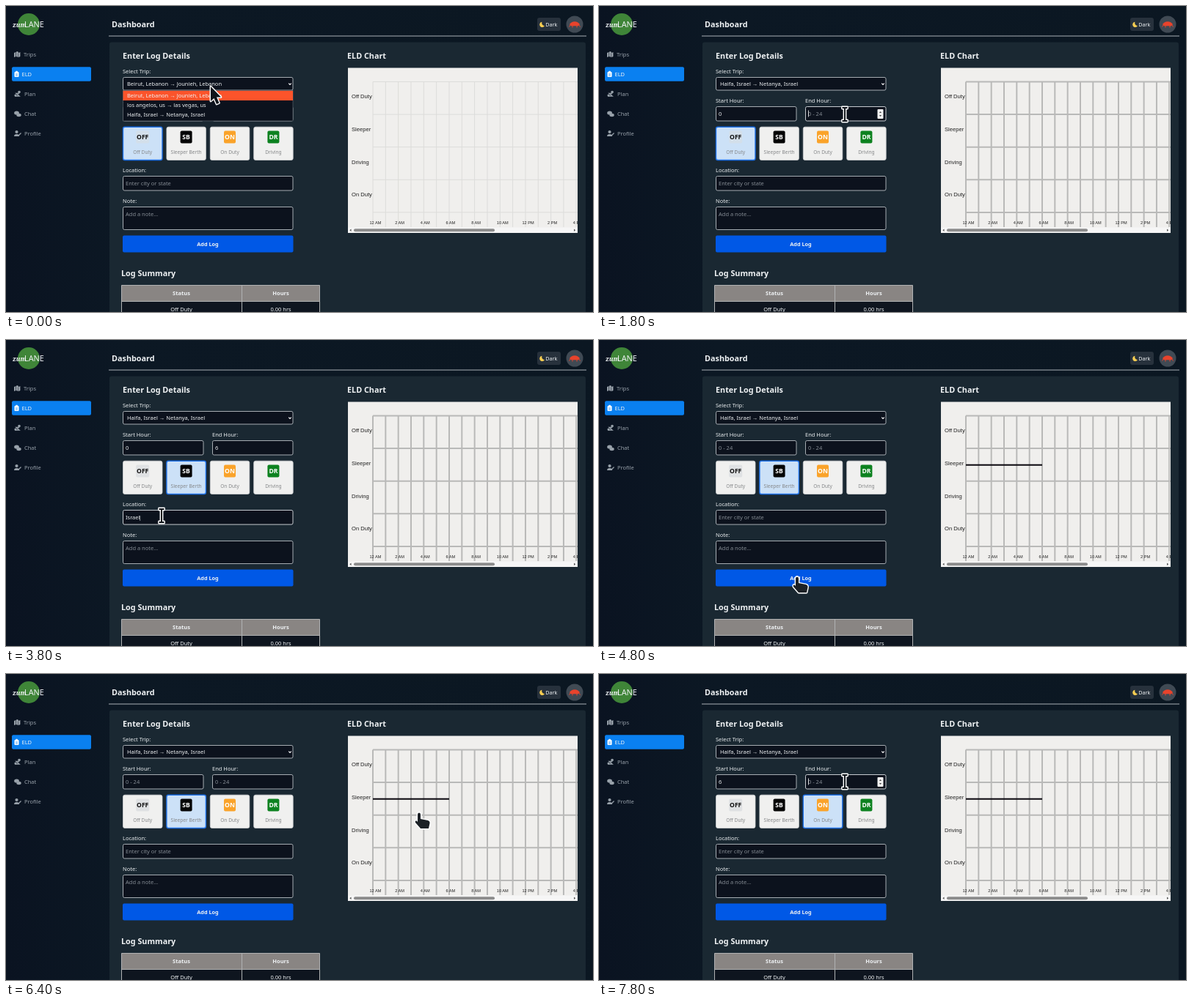
Animation, 800 px wide and 418 px high, one loop 8000 ms. Source, as an HTML page:

```html
<!DOCTYPE html>
<html lang="en">
<head>
<meta charset="utf-8">
<title>Driver log dashboard</title>
<style>
html, body { margin: 0; width: 100%; height: 100%; overflow: hidden; background: #0b1722; }
svg { display: block; width: 100%; height: 100%; }
text { font-family: "Noto Sans", "Open Sans", sans-serif; font-size: 7.5px; fill: #eef1f3; white-space: pre; }
.bold { font-weight: 700; }
.heading { font-weight: 600; font-size: 10.8px; }
.muted { fill: #98a1aa; }
.hint { fill: #858c94; }
.small { font-size: 6.6px; fill: #858789; }
.chart { font-family: "Liberation Sans", Arial, sans-serif; font-size: 7.6px; fill: #222; }
.axis { font-family: "Liberation Sans", Arial, sans-serif; font-size: 5.6px; fill: #222; }
</style>
</head>
<body>
<svg viewBox="0 0 800 418">
  <defs>
    <linearGradient id="backdrop">
      <stop offset="0" stop-color="#0a1321"/>
      <stop offset=".2" stop-color="#0c1824"/>
      <stop offset="1" stop-color="#0b1722"/>
    </linearGradient>
    <clipPath id="chartClip"><rect x="466" y="84.6" width="313" height="225.4"/></clipPath>
  </defs>
  <g id="page"></g>
  <g id="live"></g>
</svg>
<script>
const LOOP = 8000, STEP = 200;
const page = document.getElementById('page');
const live = document.getElementById('live');

const rect = (x, y, w, h, fill, extra = '') =>
  `<rect x="${x}" y="${y}" width="${w}" height="${h}" fill="${fill}" ${extra}/>`;
const text = (x, y, content, cls = '', extra = '') =>
  `<text x="${x}" y="${y}" class="${cls}" ${extra}>${content}</text>`;
const centered = (x, y, content, cls, extra = '') =>
  text(x, y, content, cls, `text-anchor="middle" ${extra}`);
const path = (d, fill, extra = '') => `<path d="${d}" fill="${fill}" ${extra}/>`;
const line = (d, stroke, width = 1) => path(d, 'none', `stroke="${stroke}" stroke-width="${width}"`);
const circle = (x, y, r, fill) => `<circle cx="${x}" cy="${y}" r="${r}" fill="${fill}"/>`;
const box = (x, y, w, h, stroke = '#a6acb2') =>
  rect(x + .5, y + .5, w - 1, h - 1, '#0c121d', `rx="2" stroke="${stroke}"`);

// Each track lists [time, value]; the value holds until the next entry.
const tracks = {
  open: [[0, true], [400, false]],
  option: [[0, 0], [200, 2]],
  start: [[0, ''], [1000, '1'], [1200, ''], [1400, '0'], [4600, ''], [7400, '6']],
  end: [[0, ''], [2000, '6'], [4600, '']],
  place: [[0, ''], [3400, 'I'], [3600, 'Isra'], [3800, 'Israel'], [4600, '']],
  focus: [[0, ''], [800, 'start'], [1800, 'end'], [2400, ''], [3200, 'place'],
          [4400, ''], [7200, 'start'], [7800, 'end']],
  duty: [[0, [0]], [2600, [0, 1]], [2800, [1]], [7000, [2]]],
  logged: [[0, false], [4600, true]],
  faintGrid: [[0, true], [200, false]],
};
const pointer = [
  [0, 279, 110, 'arrow'], [200, 262, 148, 'arrow'], [400, 262, 148, 'arrow'],
  [800, 240, 148, 'beam'], [1600, 240, 148, 'beam'], [1800, 335, 148, 'beam'],
  [2200, 335, 148, 'beam'], [2400, 294, 178, 'hand'], [2600, 243, 207, 'hand'],
  [2800, 243, 207, 'hand'], [3000, 228, 224, 'arrow'], [3200, 212, 240, 'beam'],
  [4000, 212, 240, 'beam'], [4200, 240, 288, 'beam'], [4400, 270, 324, 'hand'],
  [4800, 270, 324, 'hand'], [5000, 285, 260, 'arrow'], [5600, 314, 102, 'arrow'],
  [5800, 330, 110, 'arrow'], [6200, 500, 170, 'arrow'], [6400, 563, 190, 'hand'],
  [6600, 480, 192, 'arrow'], [6800, 312, 190, 'hand'], [7000, 305, 188, 'hand'],
  [7200, 240, 148, 'beam'], [7400, 240, 148, 'beam'], [7800, 335, 147, 'beam'],
];

const valueAt = (track, time) => track.filter(([t]) => t <= time).pop()[1];

function pointerAt(time) {
  const i = pointer.findLastIndex(([t]) => t <= time);
  const a = pointer[i], b = pointer[i + 1] || a;
  const k = a === b ? 0 : (time - a[0]) / (b[0] - a[0]);
  return { x: a[1] + (b[1] - a[1]) * k, y: a[2] + (b[2] - a[2]) * k, kind: a[3] };
}

const outlined = 'stroke="#fff" stroke-width="2.8" stroke-linejoin="round" paint-order="stroke"';
const cursors = {
  arrow: path('M0 0V20L4.5 16L8 24L11.5 22.5L8 14.5H14Z', '#10151b', outlined),
  beam: path('M-3.5-10H3.5V-8H1V8H3.5V10H-3.5V8H-1V-8H-3.5Z', '#10151b', outlined),
  hand: path('M-2 2Q-2-.5 0-.5T2 2V8L12 10Q15 11 14.5 14L13 21H2L-5 13Q-6 10-3.5 10.5L-2 12Z',
    '#1c2126', outlined),
};

function sidebar() {
  const icons = [
    path('M11 64l2.4-1v6l-2.4 1zM14 63l2.5 1v6l-2.5-1zM17 64l2.4-1v6l-2.4 1z', '#98a1aa') + circle(15.3, 63.5, 1.5, '#98a1aa'),
    rect(11.5, 90, 6, 7, '#fff', 'rx="1"') + rect(13, 88.8, 3, 2.2, '#fff', 'rx="1"') + line('M13 93H16M13 95H16', '#0a84f5', .7),
    line('M12 123H18L14 119.5H18', '#98a1aa', 1.4) + circle(13, 122, 1.6, '#98a1aa') + circle(18, 117.6, 1.8, '#98a1aa'),
    `<ellipse cx="14.5" cy="146" rx="3.4" ry="2.6" fill="#98a1aa"/><ellipse cx="17.5" cy="149" rx="3.2" ry="2.2" fill="#98a1aa"/>`,
    circle(14.5, 172, 2.1, '#98a1aa') + path('M11 178Q11 175 14.5 175T18 178Z', '#98a1aa') + line('M17 177L20.5 173.5', '#98a1aa', 1.3),
  ];
  return rect(8, 83.3, 108, 19.4, '#0a80f0', 'rx="2"') +
    ['Trips', 'ELD', 'Plan', 'Chat', 'Profile'].map((name, i) =>
      icons[i] + text(i === 1 ? 21.5 : i === 0 ? 24 : 25, 68.7 + 27.1 * i, name, i === 1 ? '' : 'muted')).join('');
}

function header() {
  return circle(31, 25, 15, '#3f8538') +
    text(9, 29, 'zum', '', 'style="font:italic 600 8.5px \'Noto Serif\',serif"') +
    text(25, 29, 'LANE', '', 'style="font-size:10.8px"') +
    text(144, 29, 'Dashboard', 'heading') +
    rect(140, 40.5, 651, 1, '#a9afb5') +
    rect(724, 16, 32, 18, '#27313c', 'rx="3"') +
    path('M730.5 21.8A3.6 3.6 0 1 0 734 27A3.7 3.7 0 0 1 730.5 21.8Z', '#f7cf52') +
    text(735.2, 28, 'Dark', '', 'style="font-size:7.2px"') +
    circle(775, 25, 11.5, '#404a54') +
    path('M768 25Q770.5 21.2 775 21.2T782 25L780 27.2H770Z', '#e8432c') +
    line('M769.5 25.5L767.5 28.5M772 27V29.5M778 27V29.5M780.5 25.5L782.5 28.5', '#e8432c');
}

function summary() {
  return text(157, 369, 'Log Summary', 'heading') +
    rect(157.5, 403, 270, 16, '#0e151f') +
    rect(157.5, 381.5, 270, 22, '#898583') +
    line('M157.5 418V381.5H427.5V418M157.5 403.5H427.5M321.5 381.5V418', '#b0b2b3') +
    centered(239, 395, 'Status', 'bold') + centered(374.5, 395, 'Hours', 'bold') +
    centered(239, 416.5, 'Off Duty') + centered(374.5, 416.5, '0.00 hrs');
}

page.innerHTML = rect(0, 0, 800, 418, 'url(#backdrop)') + rect(141, 49.5, 649, 380, '#1a2832', 'rx="3"') +
  header() + sidebar() + summary() +
  text(159, 72, 'Enter Log Details', 'heading') + text(465, 72, 'ELD Chart', 'heading') +
  text(159, 92.2, 'Select Trip:') + text(159, 131.8, 'Start Hour:') + text(281, 131.8, 'End Hour:') +
  text(159, 227, 'Location:') + text(159, 268.5, 'Note:') +
  box(159, 274, 232.5, 32) + text(163, 286.5, 'Add a note...', 'hint') +
  rect(159, 313.6, 232.5, 22.8, '#0058e6', 'rx="2"') +
  centered(275, 328, 'Add Log', 'bold', 'style="font-size:7.3px"');

function field(x, y, w, value, hint, focused, spinner) {
  const baseline = y + 12.8;
  let out = box(x, y, w, 20.5, focused ? '#c6cacf' : undefined);
  const caret = focused && value ? '<tspan dx="-1.6" font-weight="300">|</tspan>' : '';
  out += text(x + 4, baseline, (value || hint) + caret, value ? '' : 'hint');
  if (focused && !value) out += rect(x + 4, y + 5.5, .8, 9, '#fff');
  if (focused && spinner) {
    const s = x + w - 12;
    out += rect(s, y + 4, 8, 13, '#f1f1f1', 'rx="1"') +
      path(`M${s + 2.4} ${y + 9}h3.2l-1.6-2zM${s + 2.4} ${y + 12}h3.2l-1.6 2z`, '#444');
  }
  return out;
}

function tripPicker(s) {
  const trips = ['Beirut, Lebanon → Jounieh, Lebanon', 'los angelos, us → las vegas, us', 'Haifa, Israel → Netanya, Israel'];
  let out = box(159, 97, 232.5, 18.5) + text(165, 109, trips[s.open ? 0 : 2]) +
    line('M385.2 105.6L387 107.4L388.8 105.6', '#fff', 1.1);
  if (s.open) {
    out += rect(159.5, 115.5, 231.5, 41.5, '#0c121d', 'stroke="#59616a" stroke-width=".7"') +
      rect(159.5, 115.8 + 13.2 * s.option, 231.5, 13.2, '#fb542b') +
      trips.map((trip, i) => text(165, 125.1 + 13.1 * i, trip)).join('');
  }
  return out;
}

function dutyCards(active) {
  const cards = [
    ['OFF', 'Off Duty', '#dfe1e3', '#111'], ['SB', 'Sleeper Berth', '#050505', '#fff'],
    ['ON', 'On Duty', '#faa32a', '#fff'], ['DR', 'Driving', '#0d8220', '#fff'],
  ];
  return cards.map(([code, name, color, ink], i) => {
    const x = 159 + 59.4 * i, mid = x + 27.2, on = active.includes(i);
    const fill = !on ? '#f0f0ef' : active.length > 1 ? '#e2ebf3' : '#cce1f7';
    const border = !on ? '#cfd1d2' : active.length > 1 ? '#5f9fe8' : '#1d70e8';
    const badge = i === 0 && on ? '#d3dfea' : color;
    return rect(x + .5, 165.2, 53.5, 45.3, fill, `rx="2.5" stroke="${border}" stroke-width="${on ? 1.4 : .8}"`) +
      rect(mid - (i ? 8 : 9), 170.5, i ? 16 : 18, 17, badge, 'rx="2"') +
      centered(mid, 182.2, code, 'bold', `style="font-size:8.6px;fill:${ink}"`) +
      centered(mid, 202, name, 'small');
  }).join('');
}

function chart(s) {
  const left = 500, hour = 17.33, top = 103.5, row = 44.6;
  const stroke = s.faintGrid ? '#dcdcda' : '#b9b9b8';
  let grid = '', labels = '';
  for (let h = 0; h <= 16; h++) {
    grid += `M${left + h * hour} ${top}V302`;
    if (h % 2 === 0) {
      labels += text(left - 4.5 + h * hour, 297.5, `${h % 12 || 12} ${h < 12 ? 'AM' : 'PM'}`, 'axis');
    }
  }
  for (let r = 0; r <= 4; r++) grid += `M${left} ${top + r * row}H780`;
  ['Off Duty', 'Sleeper', 'Driving', 'On Duty'].forEach((name, r) => {
    labels += text(471, 126 + r * 44.8, name, 'chart');
  });
  return `<g clip-path="url(#chartClip)">` + rect(466, 84, 313, 226, '#f0efed') +
    line(grid, stroke, s.faintGrid ? 1 : 2) + labels +
    (s.logged ? rect(left, 169.7, 6 * hour, 2, '#08050c') : '') +
    rect(466, 302.5, 313, 7.5, '#f6f6f6') +
    rect(474, 304.3, 192, 4, '#8b8b8b', 'rx="2"') +
    path('M470.5 304.5v3.6l-2.2-1.8zM774 304.5v3.6l2.2-1.8z', '#555') + '</g>';
}

function draw(time) {
  const s = {};
  for (const key in tracks) s[key] = valueAt(tracks[key], time);
  const p = pointerAt(time);
  live.innerHTML =
    field(159, 137, 110.5, s.start, '0 - 24', s.focus === 'start', true) +
    field(281, 137, 110.5, s.end, '0 - 24', s.focus === 'end', true) +
    field(159, 232, 232.5, s.place, 'Enter city or state', s.focus === 'place') +
    dutyCards(s.duty) + tripPicker(s) + chart(s) +
    `<g transform="translate(${p.x} ${p.y})">${cursors[p.kind]}</g>`;
}

const begin = performance.now();
let shown = -1;
function tick() {
  const elapsed = Math.max(0, performance.now() - begin) % LOOP;
  const time = Math.floor(elapsed / STEP) * STEP;
  if (time !== shown) draw(shown = time);
  requestAnimationFrame(tick);
}
tick();
</script>
</body>
</html>
```
